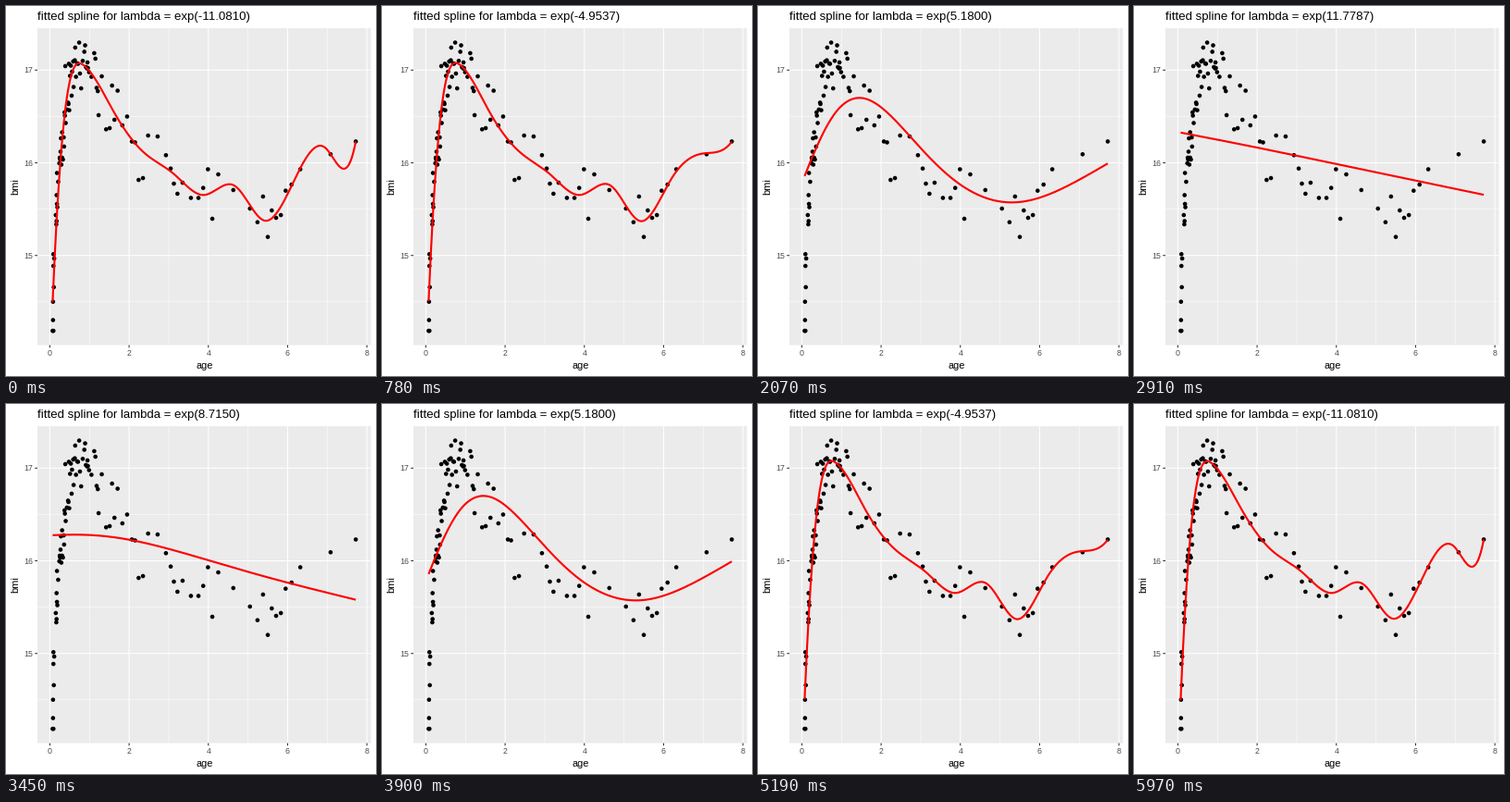
A matplotlib script that plays this animation: 400 px wide and 400 px high, repeating every 6 s.

```python
import matplotlib.pyplot as plt
import numpy as np
from matplotlib.animation import FuncAnimation
from matplotlib.patches import Rectangle

SIZE, DPI = 400, 100
PT = 72 / DPI  # points per pixel
FRAMES, INTERVAL = 200, 30
SEGMENTS = 10
LEFT, TOP, RIGHT, BOTTOM = 34, 24, 394.5, 366.6

age = np.array([
    .07, .09, .08, .08, .10, .09, .09, .11, .163, .17, .15, .19, .18, .17,
    .21, .18, .24, .29, .26, .25, .33, .31, .27, .36, .28, .35, .31, .40,
    .37, .38, .43, .46, .47, .49, .39, .48, .53, .51, .56, .55, .60, .59,
    .63, .64, .66, .69, .71, .74, .76, .79, .83, .87, .89, .91, .95, .94,
    .96, .99, 1.05, 1.12, 1.15, 1.18, 1.21, 1.23, 1.31, 1.42, 1.51, 1.57,
    1.63, 1.71, 1.83, 1.95, 2.07, 2.15, 2.24, 2.35, 2.48, 2.72, 2.93, 3.05,
    3.13, 3.22, 3.35, 3.56, 3.75, 3.87, 3.99, 4.10, 4.25, 4.63, 5.05, 5.24,
    5.38, 5.50, 5.60, 5.71, 5.83, 5.95, 6.10, 6.32, 7.085, 7.72])
bmi = np.array([
    14.187, 14.187, 14.303, 14.501, 14.658, 14.887, 15.014, 14.967, 15.336,
    15.371, 15.436, 15.521, 15.556, 15.651, 15.795, 15.890, 15.995, 15.980,
    16.035, 16.055, 16.035, 16.055, 16.120, 16.175, 16.264, 16.274, 16.329,
    16.429, 16.544, 16.509, 16.574, 16.649, 16.634, 16.567, 17.043, 17.068,
    17.048, 16.938, 16.983, 16.724, 16.818, 17.093, 17.106, 17.243, 16.928,
    17.073, 17.068, 17.297, 16.963, 16.803, 17.100, 17.198, 17.267, 17.033,
    17.083, 17.018, 17.023, 16.978, 16.928, 17.183, 17.123, 16.808, 16.773,
    16.514, 16.933, 16.361, 16.374, 16.833, 16.464, 16.778, 16.404, 16.499,
    16.230, 16.220, 15.815, 15.835, 16.294, 16.284, 16.082, 15.938, 15.775,
    15.666, 15.785, 15.621, 15.621, 15.729, 15.930, 15.396, 15.875, 15.706,
    15.506, 15.359, 15.636, 15.200, 15.486, 15.406, 15.436, 15.699, 15.765,
    15.930, 16.092, 16.230])


def px(x):
    return 47.4 + 42.84 * np.asarray(x)


def py(y):
    return 69.3 + 100.2 * (17 - np.asarray(y))


# Penalised cubic B-splines on equally spaced knots
pad = 0.001 * np.ptp(age)
lo, hi = age.min() - pad, age.max() + pad


def basis(x):
    t = (np.asarray(x) - lo) / (hi - lo) * SEGMENTS
    d = np.abs(t[:, None] - np.arange(-1, SEGMENTS + 2))
    return (np.maximum(2 - d, 0) ** 3 - 4 * np.maximum(1 - d, 0) ** 3) / 6


B = basis(age)
D = np.diff(np.eye(SEGMENTS + 3), 2, axis=0)
penalty = D.T @ D / 16
gram, rhs = B.T @ B, B.T @ bmi
grid = np.linspace(age.min(), age.max(), 300)
grid_basis = basis(grid)


def fit(log_lam):
    coef = np.linalg.solve(gram + np.exp(log_lam) * penalty, rhs)
    return grid_basis @ coef


plt.rcParams["font.family"] = "Liberation Sans"
fig = plt.figure(figsize=(SIZE / DPI, SIZE / DPI), dpi=DPI, facecolor="white")
ax = fig.add_axes([0, 0, 1, 1])
ax.set(xlim=(0, SIZE), ylim=(SIZE, 0))
ax.axis("off")


def line(x, y, color, width, z):
    return ax.plot(x, y, color=color, lw=width * PT, zorder=z, snap=False,
                   solid_capstyle="butt", solid_joinstyle="round")[0]


def label(x, y, text, size, color="black", **kw):
    return ax.text(x, y, text, fontsize=size * PT, color=color,
                   va="baseline", rotation_mode="anchor", **kw)


ax.add_patch(Rectangle((LEFT, TOP), RIGHT - LEFT, BOTTOM - TOP, lw=0,
                       fc="#EBEBEB", zorder=0, snap=False))

for v in (1, 3, 5, 7):
    line([px(v)] * 2, [TOP, BOTTOM], "white", 0.53, 1)
for v in (14.5, 15.5, 16.5):
    line([LEFT, RIGHT], [py(v)] * 2, "white", 0.53, 1)
for v in (0, 2, 4, 6, 8):
    line([px(v)] * 2, [TOP, BOTTOM], "white", 1.07, 2)
    line([px(v)] * 2, [BOTTOM, BOTTOM + 2.75], "#333333", 1.07, 2)
    label(px(v), 378.4, str(v), 8.8, "#4D4D4D", ha="center")
for v in (15, 16, 17):
    line([LEFT, RIGHT], [py(v)] * 2, "white", 1.07, 2)
    line([LEFT - 2.75, LEFT], [py(v)] * 2, "#333333", 1.07, 2)
    label(29.05, py(v) + 3.15, str(v), 8.8, "#4D4D4D", ha="right")

# Per-point sizes keep the dots at sub-pixel positions
ax.scatter(px(age), py(bmi), s=np.full(len(age), (4.6 * PT) ** 2),
           c="black", lw=0, zorder=3)
curve = line([], [], "red", 2.13, 4)

label((LEFT + RIGHT) / 2, 392, "age", 11, ha="center")
label(13.3, (TOP + BOTTOM) / 2, "bmi", 11, ha="center", rotation=90)
title = label(LEFT, 15, "", 13.2, ha="left")


def update(i):
    step = min(i, FRAMES - 1 - i)
    log_lam = -11.081 + 0.235667 * step
    curve.set_data(px(grid), py(fit(log_lam)))
    title.set_text(f"fitted spline for lambda = exp({log_lam:.4f})")
    return curve, title


anim = FuncAnimation(fig, update, frames=FRAMES, interval=INTERVAL,
                     repeat=True, repeat_delay=0)
plt.show()
```
